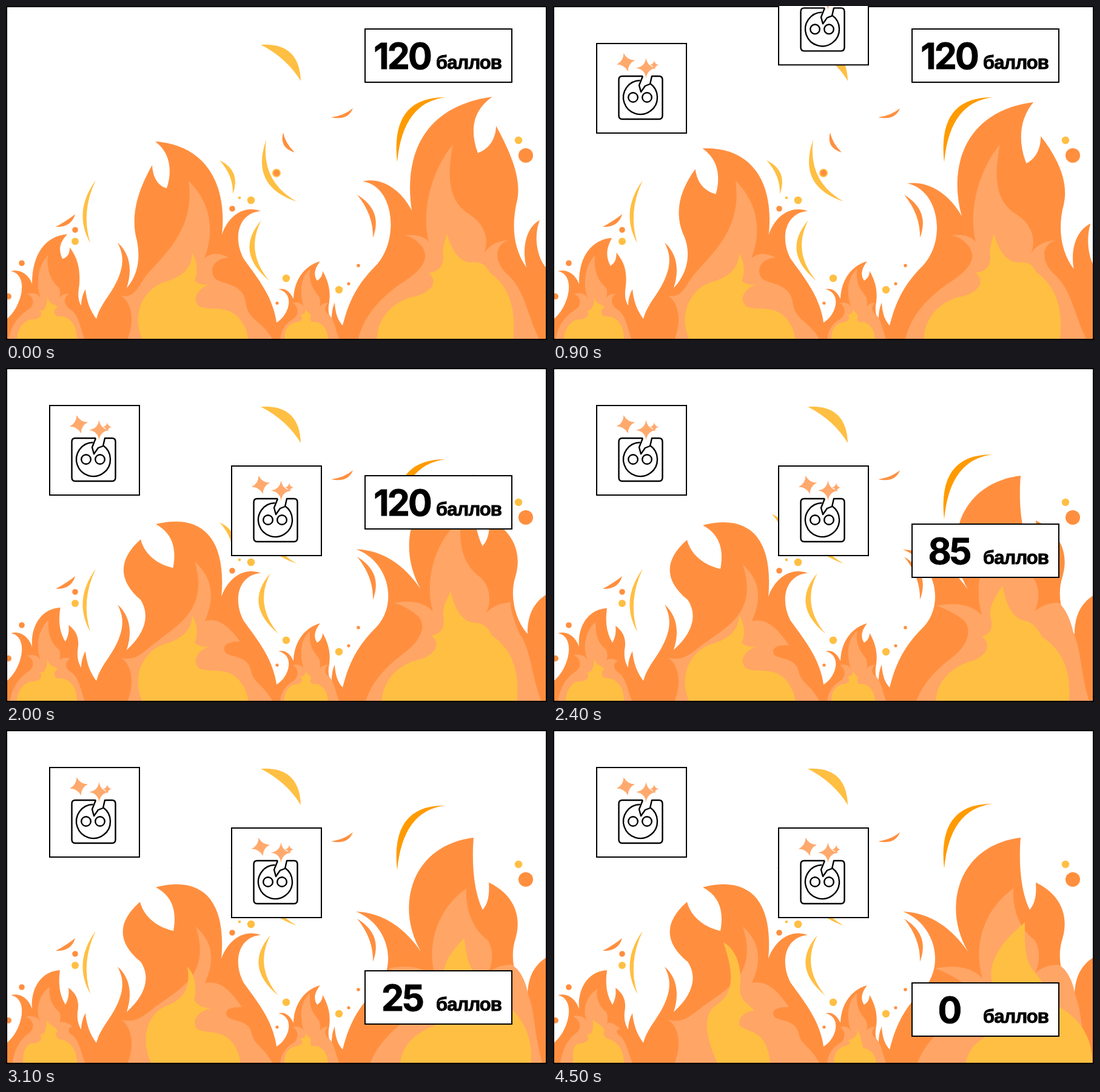
Write an HTML page that moves like this. It is 892 by 552 pixels and loops after 5.5 s.

```html
<!DOCTYPE html>
<html lang="ru">
<head>
<meta charset="utf-8">
<style>
  html, body { margin: 0; width: 100%; height: 100%; overflow: hidden; background: #fff; }
  svg { display: block; width: 892px; height: 552px; }
  text { font-family: "Liberation Sans", Arial, sans-serif; font-weight: bold; stroke: #000; }
  #points { font-family: Inter, Roboto, sans-serif; }
  .frame { fill: #fff; stroke: #000; stroke-width: 2; }
  .line { fill: none; stroke: #000; stroke-width: 2.4; stroke-linejoin: round; }
</style>
</head>
<body>
<svg viewBox="0 0 892 552">
  <defs>
    <g id="card">
      <rect class="frame" x="1" y="1" width="148" height="148"/>
      <g class="line">
        <path d="M77 55H43Q37.500 55 37.500 61V120Q37.500 126 43 126H104Q109.500 126 109.500 120V61Q109.500 55 104 55H92L89 68L81 71L74 81L71 70L77 55"/>
        <path d="M72.500 62A28 28 0 1 0 89 67"/>
        <circle cx="61" cy="90" r="7.800"/>
        <circle cx="84" cy="90" r="7.800"/>
      </g>
      <g id="stars" fill="#ffa96d"></g>
    </g>
  </defs>
  <g id="sparks"></g>
  <g id="flames"></g>
  <rect class="frame" x="1" y="1" width="890" height="550" style="fill:none"/>
  <use id="card1" href="#card"/>
  <use id="card2" href="#card"/>
  <g id="score">
    <rect class="frame" x="1" y="1" width="242" height="88"/>
    <text id="points" x="62" y="67" text-anchor="middle" font-size="59" letter-spacing="-3" stroke-width=".8"></text>
    <text x="118" y="67" font-size="31" letter-spacing="-.9" stroke-width=".9">баллов</text>
  </g>
</svg>
<script>
const ORANGE = '#ff8f3f', LIGHT = '#ffa566', YELLOW = '#ffbf43', AMBER = '#ff9b00';
const STEP = 100, LAST = 4500, LOOP = 5500;
const $ = id => document.getElementById(id);

function add(parent, tag, attrs) {
  const el = document.createElementNS('http://www.w3.org/2000/svg', tag);
  for (const key in attrs) el.setAttribute(key, attrs[key]);
  return parent.appendChild(el);
}
const progress = (t, from, to) => Math.min(1, Math.max(0, (t - from) / (to - from)));
const mix = (a, b, p) => a + (b - a) * p;
const place = (el, x, y) => el.setAttribute('transform', `translate(${x} ${y})`);

function mixPath(a, b, p) {
  const ends = b.match(/[\d.]+/g);
  let i = 0;
  return a.replace(/[\d.]+/g, n => mix(+n, +ends[i++], p).toFixed(1));
}

// Four-pointed sparkle; waist is the inner radius as a share of r
function star(cx, cy, r, turn, waist) {
  const point = (k, radius) => {
    const a = turn + k * Math.PI / 2;
    return `${cx + radius * Math.sin(a)} ${cy - radius * Math.cos(a)}`;
  };
  const sides = [1, 2, 3, 4].map(k => `Q${point(k - .5, r * waist)} ${point(k, r)}`).join('');
  add($('stars'), 'path', { d: `M${point(0, r)}${sides}Z` });
}
star(49, 32, 15.5, -.23, .28);
star(82.5, 41.5, 17, 0, .16);
star(96, 36.500, 7.5, 0, .2);

// Crescents: colour, start, outer control, end, inner control, then dx, dy, from, to
const crescents = [
  [YELLOW, '420 64', '484 60', '486 124', '463 86'],
  [AMBER, '725 151', '633 150', '645 258', '654 159', 0, -29, 2100, 3200],
  [YELLOW, '148 288', '110 340', '139 392', '123 340', 0, 44, 1500, 2000],
  [YELLOW, '429 221', '402 298', '479 323', '420 290'],
  [YELLOW, '352 255', '388 272', '374 311', '375 280', 17, -28, 2100, 2700],
  [YELLOW, '421 354', '376 406', '434 454', '394 406', 15, -15, 900, 1400],
  [ORANGE, '579 312', '622 338', '605 383', '606 345'],
  [ORANGE, '82 365', '108 366', '114 344', '102 354'],
  [ORANGE, '457 209', '450 234', '476 242', '460 226'],
  [ORANGE, '536 184', '564 190', '572 169', '558 181'],
].map(([fill, a, outer, b, inner, dx = 0, dy = 0, from = 0, to = 1]) => ({
  el: add($('sparks'), 'path', { d: `M${a}Q${outer} ${b}Q${inner} ${a}Z`, fill }), dx, dy, from, to,
}));

const dots = (fill, list) => list.forEach(([cx, cy, r]) => add($('sparks'), 'circle', { cx, cy, r, fill }));
dots(YELLOW, [[114, 389, 6], [385, 317, 2.3], [404, 321, 6.3], [446, 276, 7], [845, 222, 6.2], [549, 469, 6.2], [462, 450, 6.2]]);
dots(ORANGE, [[114, 370, 4.8], [26, 425, 4.8], [4, 480, 5], [373, 335, 4.8], [446, 276, 5], [857, 247, 12], [581, 429, 2.8], [565, 459, 2.6], [447, 491, 2.6]]);

// Flames: colour, first shape, last shape, from, to
const flames = [
  [ORANGE,
    'M0 552L0 518C25 500 40 445 8 438C25 434 38 445 43 459C43 410 65 380 101 377C90 390 85 400 93 418C104 415 105 405 105 399C121 420 122 440 121 460C118 478 119 487 124 495C124 485 127 475 131 468C133 490 140 505 149 517L160 552Z',
    'M0 552L0 518C25 500 40 445 8 438C25 434 38 445 43 461C40 425 60 398 89 397C86 420 88 437 98 454C104 443 104 433 103 426C118 437 121 450 118 466C117 478 119 487 124 495C124 485 127 475 131 468C133 490 140 505 149 517L160 552Z',
    350, 2090],
  [ORANGE,
    'M140 552L149 517C157 487 180 473 190 435C194 417 191 405 184 391C202 407 210 432 199 466C222 440 221 405 214 380C206 340 220 300 241 263C242 285 252 298 265 301C274 275 272 243 246 224C322 228 366 287 356 378C365 350 390 328 420 339C382 342 374 385 392 418C415 450 440 480 446 523L455 552Z',
    'M140 552L149 517C157 487 180 473 190 435C194 417 191 405 184 391C202 407 210 432 199 466C228 440 240 410 222 383C184 352 182 318 221 284C226 305 245 325 276 332C282 300 275 275 247 260C322 240 364 280 355 378C365 350 390 328 420 339C382 342 374 385 392 418C415 450 440 480 446 523L455 552Z',
    350, 2090],
  [ORANGE,
    'M440 552L446 523C466 512 478 475 449 468C462 465 469 474 474 484C475 450 495 428 518 422C508 435 507 445 513 454C520 450 522 443 522 438C533 457 536 475 532 495C531 507 533 514 537 516C537 505 539 497 542 490C543 510 548 520 555 528L565 552Z'],
  [ORANGE,
    'M545 552L555 528C567 480 585 455 606 433C650 392 642 297 588 290C615 282 650 300 669 338C655 245 690 165 802 150C770 172 764 205 778 243C800 235 808 215 808 198C832 242 850 285 843 320C833 362 836 400 858 432C850 400 858 365 880 354C868 385 878 420 892 434L892 552Z',
    'M545 552L555 528C567 480 585 455 606 433C648 395 633 322 577 300C622 302 657 327 684 366C640 290 670 190 771 178C768 215 770 265 786 297C797 285 797 265 796 252C830 268 853 300 840 345C830 375 838 415 860 440C860 410 870 385 900 371C898 395 898 420 900 434L900 552Z',
    350, 2090],
  [LIGHT,
    'M4 552C8 530 18 513 38 501C49 493 45 478 34 476C46 473 53 475 57 483C49 460 52 430 69 412C67 440 75 455 88 466C90 473 89 478 88 482C92 477 97 475 104 476C93 482 96 495 105 501C121 509 123 536 130 552Z',
    'M12 552C15 530 22 513 38 501C49 493 45 478 32 473C46 471 53 475 57 483C47 465 54 440 73 428C70 445 78 458 88 466C91 474 90 480 89 485C94 481 104 487 111 494C103 495 104 500 108 504C121 511 124 536 132 552Z',
    1400, 3600],
  [LIGHT,
    'M200 552C213 520 207 490 190 479C212 483 217 465 230 447C255 415 313 373 301 289C333 320 347 365 327 417C339 407 353 408 367 416C343 417 335 435 343 448C352 462 390 455 395 489C398 520 425 522 440 552Z',
    'M200 552C213 520 207 490 190 479C212 484 222 476 238 464C280 430 340 410 313 325C338 348 347 375 328 418C353 413 370 430 389 458C367 457 359 464 365 474C373 482 400 478 405 501C409 522 425 522 440 552Z',
    1400, 2100],
  [LIGHT,
    'M452 552C454 532 463 524 474 517C484 510 482 496 473 491C481 489 488 491 491 497C483 473 486 448 501 435C499 460 508 470 516 480C519 488 518 493 517 497C521 492 526 490 531 491C523 498 526 505 531 509C541 515 543 536 550 552Z'],
  [LIGHT,
    'M580 552C590 515 610 490 645 463C682 440 700 421 687 399C679 388 669 381 657 379C678 377 690 381 697 390C684 340 702 270 737 229C723 300 738 328 765 345C788 360 798 385 788 409C796 396 810 388 829 387C801 396 808 425 824 441C857 469 858 510 880 552Z',
    'M600 552C612 520 635 498 660 479C690 455 688 428 676 418C664 410 652 402 630 394C672 386 694 396 708 410C693 360 708 298 759 262C757 302 773 332 794 347C804 362 803 385 795 401C809 391 819 388 834 388C849 397 858 418 861 438C873 467 871 510 885 552Z',
    1200, 2500],
  [YELLOW,
    'M18 552C18 536 27 522 40 518C53 519 64 511 55 503C62 505 68 499 68 480C72 497 80 490 85 498C79 501 77 508 84 513C103 511 118 525 117 552Z',
    'M33 552C33 536 31 522 42 518C53 519 64 511 55 503C64 505 67 497 66 479C75 487 84 490 85 498C81 503 85 506 89 510C106 513 118 530 117 552Z',
    2100, 3600],
  [YELLOW,
    'M225 552C205 507 228 465 265 455C293 446 306 432 307 409C316 422 317 442 311 454C319 461 328 462 340 459C318 464 305 483 318 496C335 505 365 492 385 517C395 529 398 540 400 552Z',
    'M272 552C254 516 245 473 266 457C292 440 304 418 281 351C300 361 313 389 308 428C309 446 317 449 333 464C315 464 304 478 308 489C321 498 342 499 351 521C356 533 358 543 358 552Z',
    2800, 3760],
  [YELLOW,
    'M459 552C459 533 466 526 476 523C488 522 492 515 484 510C491 511 495 506 494 501C499 508 502 508 503 513C499 520 505 524 512 522C524 526 531 536 531 552Z',
    'M463 552C463 533 470 526 480 523C490 520 493 516 485 513C496 511 503 505 502 495C509 507 506 514 511 519C508 523 512 526 518 527C527 532 533 540 533 552Z',
    3300, 4400],
  [YELLOW,
    'M611 552C613 517 632 495 664 482C695 478 717 459 697 441C716 439 724 426 720 407C721 395 724 388 727 376C735 405 747 422 766 424C787 421 793 432 797 440C826 461 842 493 836 552Z',
    'M680 552C686 525 698 515 725 500C752 484 754 463 733 450C744 439 732 427 723 413C717 376 749 342 778 318C778 350 777 377 791 397C807 414 817 433 832 456C866 475 890 505 889 552Z',
    1700, 4200],
].map(([fill, first, last, from, to]) => ({ el: add($('flames'), 'path', { d: first, fill }), first, last, from, to }));

function draw(t) {
  for (const f of flames) if (f.last) f.el.setAttribute('d', mixPath(f.first, f.last, progress(t, f.from, f.to)));
  for (const c of crescents) {
    const p = progress(t, c.from, c.to);
    place(c.el, c.dx * p, c.dy * p);
  }
  place($('card1'), 71, mix(-158, 61, progress(t, 0, 600)));
  place($('card2'), 371, mix(-158, 161, progress(t, 700, 1300)));
  place($('score'), 591, mix(37, 417, progress(t, 1300, 3200)));
  $('points').textContent = Math.floor(mix(120, 0, progress(t, 2000, 3400)));
}

const start = performance.now();
function tick() {
  const t = (performance.now() - start) % LOOP;
  draw(Math.min(LAST, Math.floor(t / STEP) * STEP));
  requestAnimationFrame(tick);
}
tick();
</script>
</body>
</html>
```
